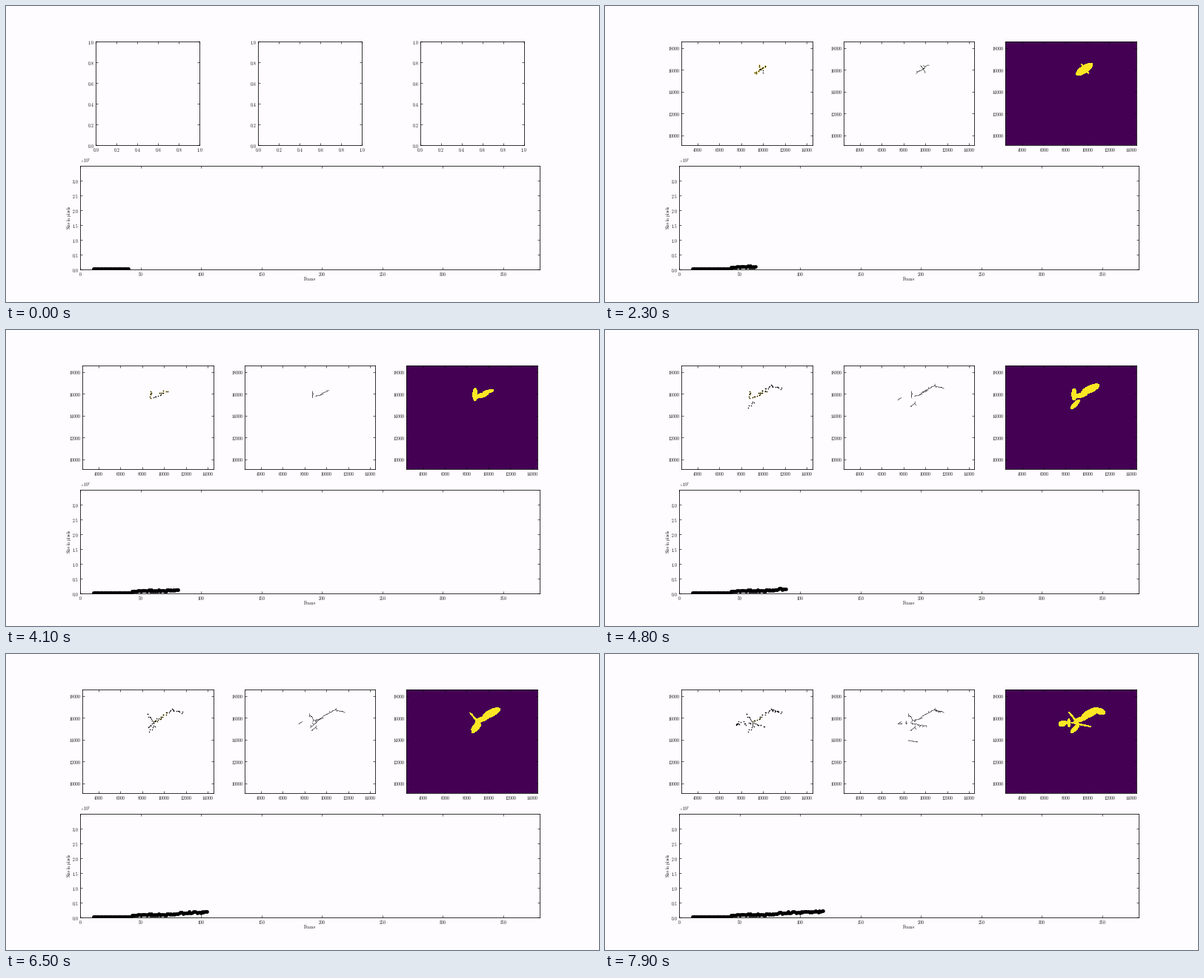
These frames come from a looping animation (800x400 px, 8 s). A matplotlib script:

```python
import numpy as np
import matplotlib.pyplot as plt
from matplotlib.animation import FuncAnimation
from matplotlib.collections import LineCollection, PolyCollection

W, H, DPI = 800, 400, 40
FRAMES, STEP = 80, 100
BG, PURPLE, YELLOW = "#fefcfe", "#440154", "#fde725"
X0, X1, Y0, Y1 = 2500, 14500, 9100, 18600
TOP, SIDE = 48, 140
WIDE = SIDE * (X1 - X0) / (Y1 - Y0)
LEFTS = [102.8 + 218.8 * i for i in range(3)]

plt.rcParams.update({
    "mathtext.fontset": "cm", "font.size": 10, "axes.linewidth": 1.4,
    "xtick.top": True, "ytick.right": True,
})
for axis in "xy":
    plt.rcParams.update({
        f"{axis}tick.direction": "in", f"{axis}tick.major.size": 5,
        f"{axis}tick.major.width": 1.1, f"{axis}tick.major.pad": 4,
    })

fig = plt.figure(figsize=(W / DPI, H / DPI), dpi=DPI, facecolor=BG)


def add_axes(left, top, width, height, xlim, ylim, xticks, yticks, xfmt, yfmt):
    ax = fig.add_axes([left / W, 1 - (top + height) / H, width / W, height / H],
                      facecolor=BG)
    ax.set(xlim=xlim, ylim=ylim)
    ax.set_xticks(xticks, [f"${v:{xfmt}}$" for v in xticks])
    ax.set_yticks(yticks, [f"${v:{yfmt}}$" for v in yticks])
    return ax


def roman(x, y, text, **kw):
    text = text.replace(" ", r"\ ")
    fig.text(x / W, 1 - y / H, rf"$\mathrm{{{text}}}$",
             ha="center", va="center", **kw)


unit = np.linspace(0, 1, 6)
blank = [add_axes(x + (WIDE - SIDE) / 2, TOP, SIDE, SIDE, (0, 1), (0, 1),
                  unit, unit, ".1f", ".1f") for x in LEFTS]
panels = [add_axes(x, TOP, WIDE, SIDE, (X0, X1), (Y0, Y1),
                   range(4000, 14001, 2000), range(10000, 18001, 2000), "d", "d")
          for x in LEFTS]
panels[2].set_facecolor(PURPLE)

chart = add_axes(100, 216, 620, 140, (0, 380), (0, 3.5),
                 range(0, 351, 50), np.arange(0, 3.1, 0.5), "d", ".1f")
roman(410, 368.3, "Frame")
roman(84.5, 286, "Size in pixels", rotation=90)
fig.text(100 / W, 1 - 214.5 / H, r"$\times 10^7$", ha="left", va="bottom")


def to_data(p):
    """Stage pixels of the middle panel to data units."""
    scale = (X1 - X0) / WIDE
    p = np.asarray(p, float)
    return np.stack([X0 + (p[..., 0] - LEFTS[1]) * scale,
                     Y1 - (p[..., 1] - TOP) * scale], axis=-1)


# (first stage, last stage): limbs as girth of the mask and two end points
LIMBS = {
    (0, 0): [(9, 418, 90, 428, 86), (5.5, 428, 84.5, 436, 80)],
    (1, 1): [(9.5, 420, 91, 436, 80), (2, 426, 81, 432, 89)],
    (2, 3): [(6, 414, 82, 414, 92), (4, 427, 84.5, 436, 82)],
    (2, 5): [(5.5, 417, 90, 429, 86.5)],
    (3, 5): [(9, 427, 84, 445, 75.5), (0, 444, 75.5, 457, 79),
             (5, 412, 104, 419, 97), (0, 395, 95, 399, 92)],
    (4, 4): [(4.5, 411, 100, 424, 87)],
    (4, 5): [(1.3, 409, 81, 418, 92)],
    (5, 5): [(7, 396, 95, 401, 93), (1.4, 412, 93, 434, 97.5),
             (7.5, 444, 75.5, 453, 79), (4, 407, 91, 407, 95),
             (0, 409, 117, 422, 118)],
}
STARTS = [1, 15, 29, 43, 57, 72]
TURN = np.linspace(0, 2 * np.pi, 48)


def walk(limb, rng, gap=2.0, spread=0.7):
    """Points from end to end, shaken a little."""
    a, b = np.array(limb[1:], float).reshape(2, 2)
    n = max(4, int(np.hypot(*(b - a)) / gap) + 1)
    return np.linspace(a, b, n) + rng.uniform(-spread, spread, (n, 2))


def limbs_at(stage):
    return [limb for (first, last), group in LIMBS.items()
            if first <= stage <= last for limb in group]


def grow(stage):
    """Tree lines and dots of one stage."""
    lines, dots = [], []
    for limb in limbs_at(stage):
        rng = np.random.default_rng(int(sum(limb)))
        line = walk(limb, rng)
        lines.append(line)
        for p in line[1::2]:
            lines.append(np.array([p, p + rng.uniform(-2.6, 2.6, 2)]))
        x, y = limb[1:3]
        if y < 110 and (x > 402 or stage == 5):
            dense = stage == 0 or x < 402
            dots.append(walk(limb, rng, 1.2 if dense else 1.8, 1.4))
    return [to_data(l) for l in lines], to_data(np.vstack(dots))


def ellipse(limb, rng):
    """Mask outline around a limb, slightly different on every call."""
    girth, xa, ya, xb, yb = limb
    u = (np.hypot(xb - xa, yb - ya) + 6 + rng.uniform(-.6, .6)) / 2 * np.cos(TURN)
    v = girth / 2 * np.sin(TURN)
    a = np.arctan2(yb - ya, xb - xa) + rng.uniform(-.04, .04)
    return to_data(np.c_[(xa + xb) / 2 + u * np.cos(a) - v * np.sin(a),
                         (ya + yb) / 2 + u * np.sin(a) + v * np.cos(a)])


TREES = [grow(s) for s in range(len(STARTS))]

count = np.arange(11, 120)
size = np.where(count < 43, .02, .08 + .0008 * (count - 43)
                + .05 * (count > 82) + .0016 * np.maximum(count - 100, 0))
size += (count > 46) * np.random.default_rng(3).uniform(-.03, .03, count.size)

trace, = chart.plot([], [], "ko", ms=8, mew=0.5)
glow, = panels[0].plot([], [], "o", color="#fdd81c", mew=0)
dots, = panels[0].plot([], [], "ko", ms=2.7, mew=0)
tree = LineCollection([], colors="black", linewidths=0.95)
panels[1].add_collection(tree, autolim=False)
mask = PolyCollection([], facecolors=YELLOW, edgecolors="none", antialiased=False)
panels[2].add_collection(mask, autolim=False)


def update(k):
    for ax in blank:
        ax.set_visible(k == 0)
    for ax in panels:
        ax.set_visible(k > 0)
    seen = count <= 40 + k
    trace.set_data(count[seen], size[seen])
    if k == 0:
        return
    stage = int(np.searchsorted(STARTS, k, side="right")) - 1
    lines, pts = TREES[stage]
    tree.set_segments(lines)
    dots.set_data(pts[:, 0], pts[:, 1])
    lit = pts[:int(len(pts) * (1 - .18 * stage))]
    glow.set_data(lit[:, 0], lit[:, 1])
    glow.set_markersize(2.6 + 5.4 / (1 + stage) ** 2)
    rng = np.random.default_rng(k)
    mask.set_verts([ellipse(l, rng) for l in limbs_at(stage) if l[0]])


anim = FuncAnimation(fig, update, frames=FRAMES, interval=STEP, repeat=True,
                     repeat_delay=0, blit=False, cache_frame_data=False)
plt.show()
```
